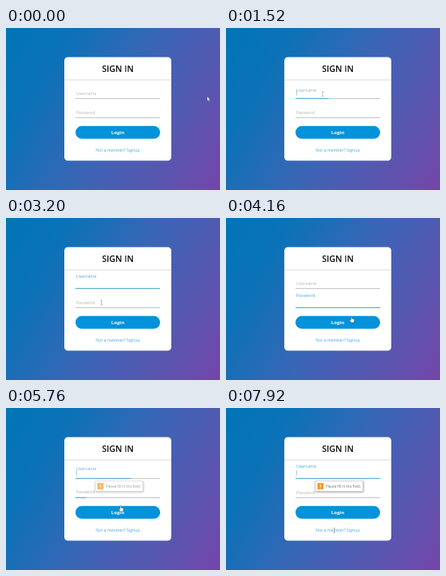
Animation of 268x203 px, one loop 8 s. Source, as an HTML page:

```html
<!DOCTYPE html>
<html lang="en">
<head>
<meta charset="utf-8">
<title>Sign in</title>
<style>
  html, body { margin: 0; width: 100%; height: 100%; overflow: hidden; }
  body { background: linear-gradient(120deg, #0075b6, #0c72b7 22%, #3b65b5 52%, #5757b0 76%, #7445a9); }
  svg { display: block; width: 268px; height: 203px; font-family: "Open Sans", "Noto Sans", sans-serif; }
</style>
</head>
<body>
<svg viewBox="0 0 268 203">
  <defs>
    <filter id="soft" x="-10%" y="-30%" width="120%" height="170%">
      <feDropShadow dx=".6" dy=".9" stdDeviation=".8" flood-opacity=".35"/>
    </filter>
  </defs>

  <rect x="73" y="36.5" width="134" height="129.7" rx="4.5" fill="#fff"/>
  <text x="140" y="55" font-size="10.7" font-weight="600" text-anchor="middle" fill="#080808">SIGN <tspan fill="#06304f">I</tspan>N</text>
  <path d="M73 65H207" stroke="#d2d2d2" stroke-width=".8"/>

  <g id="user">
    <path d="M87 88.4H193" stroke="#b4b4b4" stroke-width=".8"/>
    <rect class="bar" x="87" y="87.8" width="0" height="1.1" fill="#55aed6"/>
    <text class="label" x="88" font-size="5.2">Username</text>
    <path class="caret" d="M88.5 78.5V84.5" stroke="#86b4cc" stroke-width=".7"/>
  </g>
  <g id="pass">
    <path d="M87 112.4H193" stroke="#b4b4b4" stroke-width=".8"/>
    <rect class="bar" x="87" y="111.8" width="0" height="1.1" fill="#55aed6"/>
    <text class="label" x="88" font-size="5.2">Password</text>
    <path class="caret" d="M88.5 102.5V108.5" stroke="#86b4cc" stroke-width=".7"/>
  </g>

  <rect x="87" y="122.8" width="106" height="16" rx="8" fill="#0492da"/>
  <text x="140" y="133" font-size="6" font-weight="700" text-anchor="middle" fill="#fff">Login</text>
  <text x="140" y="155" font-size="5.2" text-anchor="middle" fill="#48a6dc">Not a member? Signup</text>

  <g id="tip">
    <rect x="111.7" y="91.3" width="59.8" height="13.2" rx=".6" fill="#fff" stroke="#b4b4b4" stroke-width=".6" filter="url(#soft)"/>
    <rect x="114.5" y="94" width="7.5" height="8" rx=".8" fill="#f8981d"/>
    <path d="M118.25 95.6V98.8M118.25 99.7V100.7" stroke="#fff" stroke-width="1"/>
    <text x="125" y="99.8" font-size="4.4" fill="#777">Please fill in this field.</text>
  </g>

  <g id="cursor">
    <path id="arrow" d="M0 0V5.2L1.2 4.2L2 6L2.9 5.6L2.1 3.8H3.7Z" fill="#fff" stroke="#666" stroke-width=".5"/>
    <path id="beam" d="M-1.1-2.8H1.1M0-2.8V2.8M-1.1 2.8H1.1" fill="none" stroke="#777" stroke-width=".5"/>
    <path id="hand" d="M-.6 .4Q0-.4 .6 .4V2.6L3.4 3.3Q4 3.5 3.8 4.4L3 7.4H-.3L-2.2 4.6Q-2.3 3.6-1.4 4L-.6 4.7Z" fill="#fff" stroke="#333" stroke-width=".4"/>
  </g>
</svg>
<script>
const LOOP = 8000, FADE = 500, BLINK = 530;
const $ = id => document.getElementById(id);
const clamp = v => Math.max(0, Math.min(1, v));
const mix = (a, b, k) => a + (b - a) * k;

// cubic-bezier(.25, .1, .25, 1)
function ease(x) {
  if (x <= 0 || x >= 1) return clamp(x);
  let lo = 0, hi = 1, s;
  for (let i = 0; i < 20; i++) {
    s = (lo + hi) / 2;
    const bx = .75 * s * (1 - s) + s * s * s;
    if (bx < x) lo = s; else hi = s;
  }
  return .3 * s * (1 - s) * (1 - s) + 3 * s * s * (1 - s) + s * s * s;
}

// time, x, y of the pointer's hot spot
const path = [
  [0, 252, 86], [400, 205, 87], [800, 149, 81], [1280, 122, 82], [1440, 122, 82],
  [2080, 101, 97], [2700, 111, 103], [3280, 120, 106], [3440, 120, 106],
  [4160, 157, 123.5], [4880, 144, 122.5], [5760, 143.5, 122.3],
  [6300, 139, 134], [6960, 136, 143], [7920, 135.5, 153.5], [8000, 135.5, 153.5]
];

const fields = [
  { el: $("user"), base: 84, focus: [[1400, 3380], [5570, Infinity]] },
  { el: $("pass"), base: 108, focus: [[3380, 5470]] }
];
for (const f of fields)
  for (const c of ["bar", "label", "caret"]) f[c] = f.el.querySelector("." + c);

function pointer(t) {
  const i = path.findIndex(p => p[0] > t);
  const [a, b] = [path[i - 1], path[i]];
  const k = (t - a[0]) / (b[0] - a[0]);
  const s = k * k * (3 - 2 * k);
  return [mix(a[1], b[1], s), mix(a[2], b[2], s)];
}

function shape(x, y) {
  const within = (l, t, r, b) => x >= l && x <= r && y >= t && y <= b;
  if (within(87, 122, 193, 139)) return "hand";
  if (within(87, 74, 193, 89) || within(87, 98, 193, 113) || within(113, 150, 151, 157)) return "beam";
  return "arrow";
}

function drawField(f, t) {
  let k = 0, caret = false;
  for (const [on, off] of f.focus) {
    if (t < on) continue;
    k = ease((t - on) / FADE) * (1 - ease((t - off) / FADE));
    caret = t < off && Math.floor((t - on) / BLINK) % 2 === 0;
  }
  f.bar.setAttribute("width", 106 * k);
  f.label.setAttribute("y", f.base - 9 * k);
  const rgb = [[178, 72], [178, 166], [178, 220]].map(([a, b]) => Math.round(mix(a, b, k)));
  f.label.setAttribute("fill", `rgb(${rgb})`);
  f.caret.setAttribute("visibility", caret ? "visible" : "hidden");
}

function draw(t) {
  fields.forEach(f => drawField(f, t));
  $("tip").setAttribute("opacity", clamp((t - 5570) / 270));
  const [x, y] = pointer(t), kind = shape(x, y);
  $("cursor").setAttribute("transform", `translate(${x} ${y})`);
  for (const id of ["arrow", "beam", "hand"])
    $(id).setAttribute("visibility", id === kind ? "visible" : "hidden");
}

const start = performance.now();
function tick() {
  draw((performance.now() - start) % LOOP);
  requestAnimationFrame(tick);
}
tick();
</script>
</body>
</html>
```
